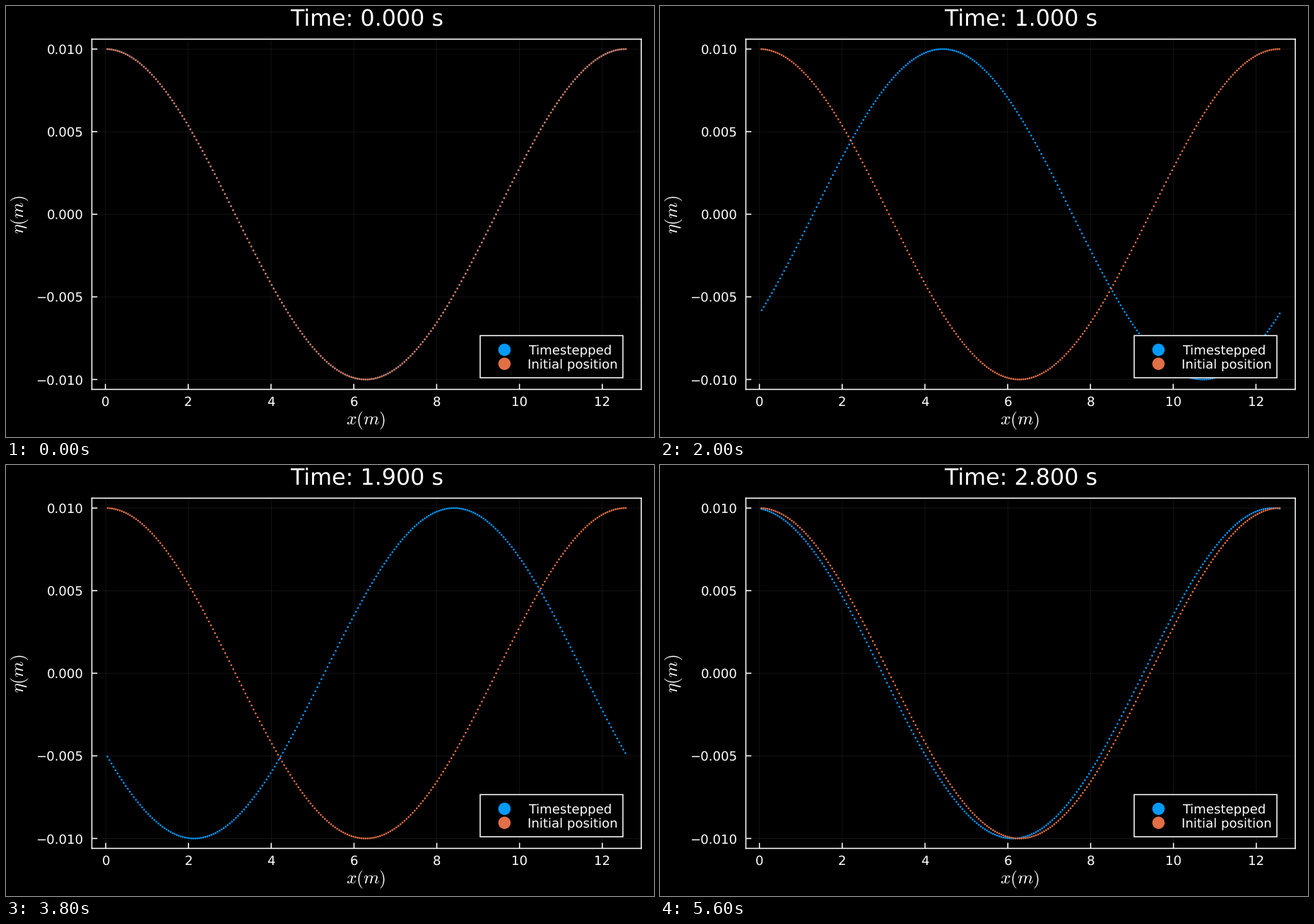
A matplotlib script for the animation above (5800 ms loop, 917 by 611 pixels).

```python
import numpy as np
import matplotlib.pyplot as plt
from matplotlib.animation import FuncAnimation
from matplotlib.patches import Rectangle

W, H, DPI = 917, 611, 100
PT = 72 / DPI  # points per pixel
BLUE, ORANGE = "#009afa", "#e26f46"
FRAMES, INTERVAL, DT = 29, 200, 0.1

# Deep-water linear wave followed by surface particles
AMP, K, N = 0.01, 0.5, 256
OMEGA = np.sqrt(9.81 * K)
LABELS = 4 * np.pi * np.arange(1, N + 1) / N

plt.rcParams.update({
    "font.family": "DejaVu Sans",
    "mathtext.fontset": "cm",
    "text.hinting": "none",
    "text.kerning_factor": 6,  # no kerning
    "text.color": "white",
})

LEFT, RIGHT, TOP, BOTTOM = 121.5, 899, 47, 543.5
TICK, LINE = 7.8, 1.55
XTICKS, YTICKS = np.arange(0, 13, 2), np.linspace(-AMP, AMP, 5)

fig = plt.figure(figsize=(W / DPI, H / DPI), dpi=DPI, facecolor="black")
ax = fig.add_axes([LEFT / W, 1 - BOTTOM / H, (RIGHT - LEFT) / W, (BOTTOM - TOP) / H],
                  facecolor="black")
over = fig.add_axes([0, 0, 1, 1], zorder=5)
over.set(xlim=(0, W), ylim=(H, 0))
over.axis("off")


def particles(t):
    phase = K * LABELS - OMEGA * t
    return LABELS - AMP * np.sin(phase), AMP * np.cos(phase)


def padded(lo, hi):
    pad = 0.03 * (hi - lo)
    return lo - pad, hi + pad


def write(x, y, s, px, **kw):
    return over.text(x, y, s, fontsize=px * PT, **kw)


def dots(axes, x, y, color, size):
    return axes.scatter(x, y, s=(size * PT) ** 2, c=color, linewidths=0,
                        edgecolors="none", zorder=3, snap=False)


ax.set_ylim(padded(-AMP, AMP))
ax.set_xticks(XTICKS)
ax.set_yticks(YTICKS)
ax.yaxis.set_major_formatter(lambda v, _: f"{v:.3f}".replace("-", "\u2212"))
ax.tick_params(length=0, labelcolor="white", labelsize=18.2 * PT, pad=12 * PT)
ax.tick_params(axis="x", pad=10 * PT)
ax.grid(color="white", alpha=0.1, lw=0.78 * PT, snap=False)
ax.set_axisbelow(True)
for spine in ax.spines.values():
    spine.set(color="white", linewidth=LINE * PT, snap=False)

# Inward tick marks
mark = dict(colors="white", lw=LINE * PT, snap=False)
ax.vlines(XTICKS, 0, TICK / (BOTTOM - TOP), transform=ax.get_xaxis_transform(), **mark)
ax.hlines(YTICKS, 0, TICK / (RIGHT - LEFT), transform=ax.get_yaxis_transform(), **mark)

title = write(402, 28, "", 31.8, va="baseline")
write(509, 587, r"$x(m)$", 25.6, ha="center", va="center")
write(19, 296, r"$\eta(m)$", 25.6, ha="center", va="center", rotation=90)

over.add_patch(Rectangle((671, 467.3), 202, 59.7, fc="black", ec="white",
                         lw=LINE * PT, snap=False))
for x, y, color, name in [(739, 487.4, BLUE, "Timestepped"),
                          (738, 507.2, ORANGE, "Initial position")]:
    dots(over, 705.4, y, color, 17.5)
    write(x, y + 6.6, name, 18.2, va="baseline")

x0, y0 = particles(0)
moving = dots(ax, x0, y0, BLUE, 2.7)
dots(ax, x0, y0, ORANGE, 2.7)


def update(i):
    t = i * DT
    x, y = particles(t)
    moving.set_offsets(np.column_stack([x, y]))
    ax.set_xlim(padded(min(x.min(), x0.min()), max(x.max(), x0.max())))
    ax.set_ylim(padded(-AMP, AMP))
    title.set_text(f"Time: {t:.3f} s")
    return moving, title


anim = FuncAnimation(fig, update, frames=FRAMES, interval=INTERVAL,
                     repeat=True, repeat_delay=0, blit=False)
plt.show()
```
